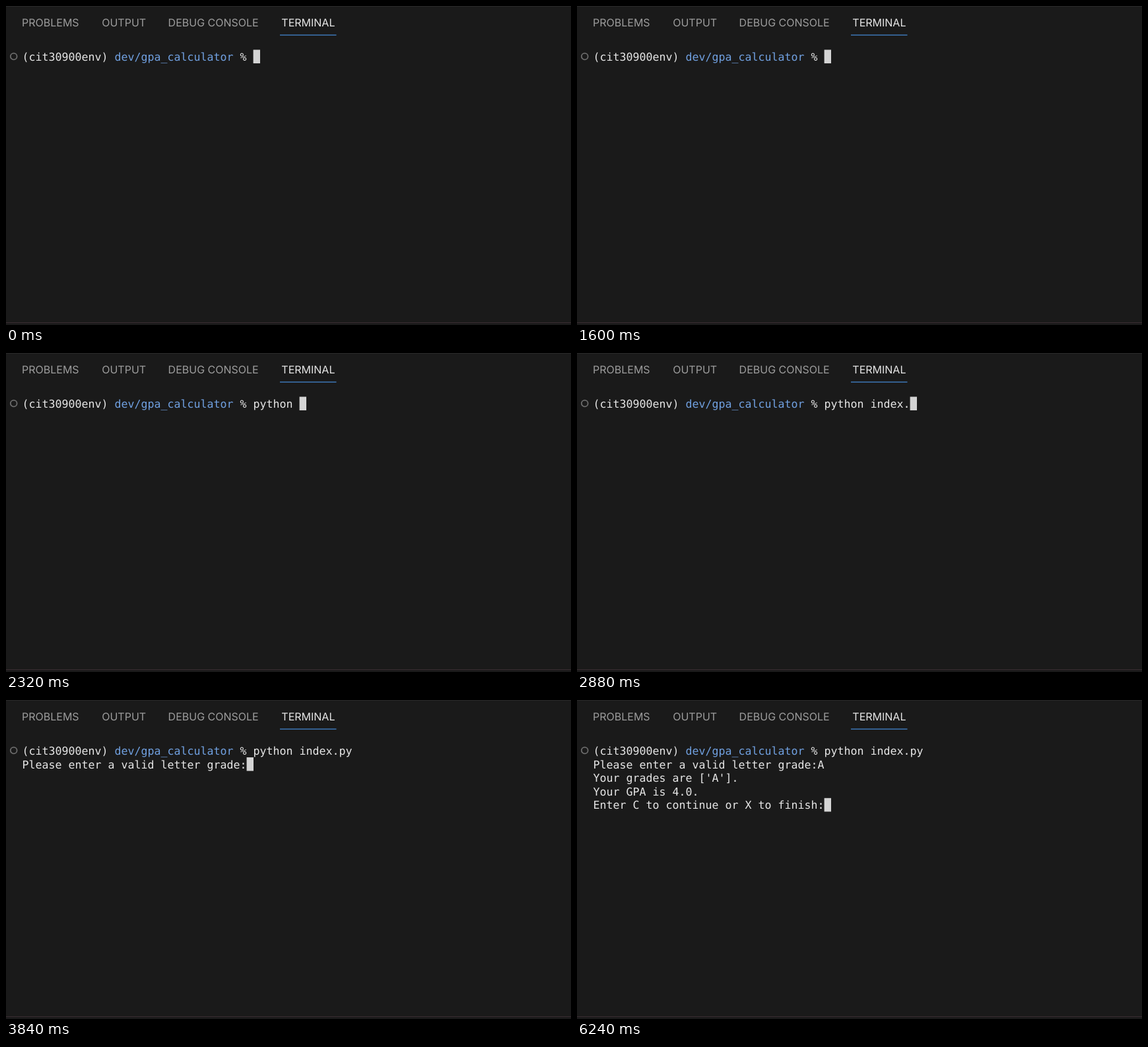
Write an HTML page that moves like this. It is 856x484 px and loops after 8 s.

```html
<!DOCTYPE html>
<html lang="en">
<head>
<meta charset="utf-8">
<title>Terminal session</title>
<style>
  html, body { margin: 0; width: 100%; height: 100%; overflow: hidden; background: #1a1a1a; }
  svg { display: block; width: 856px; height: 484px; }
  text { white-space: pre; text-rendering: geometricPrecision; }
  .tabs { font: 16px Inter, sans-serif; fill: #9d9d9d; }
  .tabs .active { fill: #e7e7e7; }
  .term { font: 16.61px "DejaVu Sans Mono", monospace; fill: #e6e6e6; }
  .path { fill: #70a0e0; }
</style>
</head>
<body>
<svg viewBox="0 0 856 484">
  <rect width="856" height="484" fill="#1a1a1a"/>
  <rect width="856" height="1" fill="#292929"/>
  <rect y="480" width="856" height="1" fill="#3a2d32"/>
  <g class="tabs">
    <text x="24" y="31.2">PROBLEMS</text>
    <text x="145.2" y="31.2">OUTPUT</text>
    <text x="245.6" y="31.2">DEBUG CONSOLE</text>
    <text x="417.3" y="31.2" class="active">TERMINAL</text>
  </g>
  <rect x="415" y="43.4" width="85.5" height="1.4" fill="#3f7cc0"/>
  <circle cx="11.7" cy="76.5" r="4.9" fill="none" stroke="#6c6c6c" stroke-width="1.8"/>
  <g class="term" id="term"></g>
  <rect id="cursor" width="10.4" height="20.6" fill="#d4d4d4"/>
</svg>
<script>
const LOOP = 8000, LEFT = 24.6, TOP = 66.4, CELL = 10, LINE = 20.6, BASELINE = 16.6;
const ENV = "(cit30900env) ", PATH = "dev/gpa_calculator", COMMAND = "python index.py";
const PROMPT_LENGTH = ENV.length + PATH.length + 3;
const QUESTION = "Please enter a valid letter grade:";

// [time, typed characters of the command]
const keys = [
  [0, 0], [1680, 1], [1760, 2], [1920, 3], [2000, 4], [2080, 5], [2160, 6],
  [2320, 7], [2400, 8], [2480, 10], [2640, 11], [2800, 12], [2880, 13],
  [3120, 14], [3200, 15]
];

// [time, lines below the command]
const outputs = [
  [0, []],
  [3600, [""]],
  [3840, [QUESTION]],
  [5280, [QUESTION + "A"]],
  [6240, [QUESTION + "A", "Your grades are ['A'].", "Your GPA is 4.0.",
          "Enter C to continue or X to finish:"]]
];

const term = document.getElementById("term");
const cursor = document.getElementById("cursor");

function add(tag, parent, attributes = {}, content = "") {
  const node = document.createElementNS("http://www.w3.org/2000/svg", tag);
  for (const name in attributes) node.setAttribute(name, attributes[name]);
  node.textContent = content;
  return parent.appendChild(node);
}

const rows = Array.from({ length: 5 }, (_, i) =>
  add("text", term, { x: LEFT, y: TOP + BASELINE + i * LINE }));
add("tspan", rows[0], {}, ENV);
add("tspan", rows[0], { class: "path" }, PATH);
add("tspan", rows[0], {}, " % ");
const command = add("tspan", rows[0]);

const valueAt = (steps, time) => steps.findLast(([start]) => start <= time)[1];

let shown = "";
function draw(time) {
  const typed = valueAt(keys, time);
  const lines = valueAt(outputs, time);
  const state = typed + lines.join("\n") + lines.length;
  if (state === shown) return;
  shown = state;

  command.textContent = COMMAND.slice(0, typed);
  rows.slice(1).forEach((row, i) => { row.textContent = lines[i] || ""; });
  const column = lines.length ? lines.at(-1).length : PROMPT_LENGTH + typed;
  cursor.setAttribute("x", LEFT + column * CELL);
  cursor.setAttribute("y", TOP + lines.length * LINE);
}

const start = performance.now();
function tick() {
  draw((performance.now() - start) % LOOP);
  requestAnimationFrame(tick);
}
tick();
</script>
</body>
</html>
```
